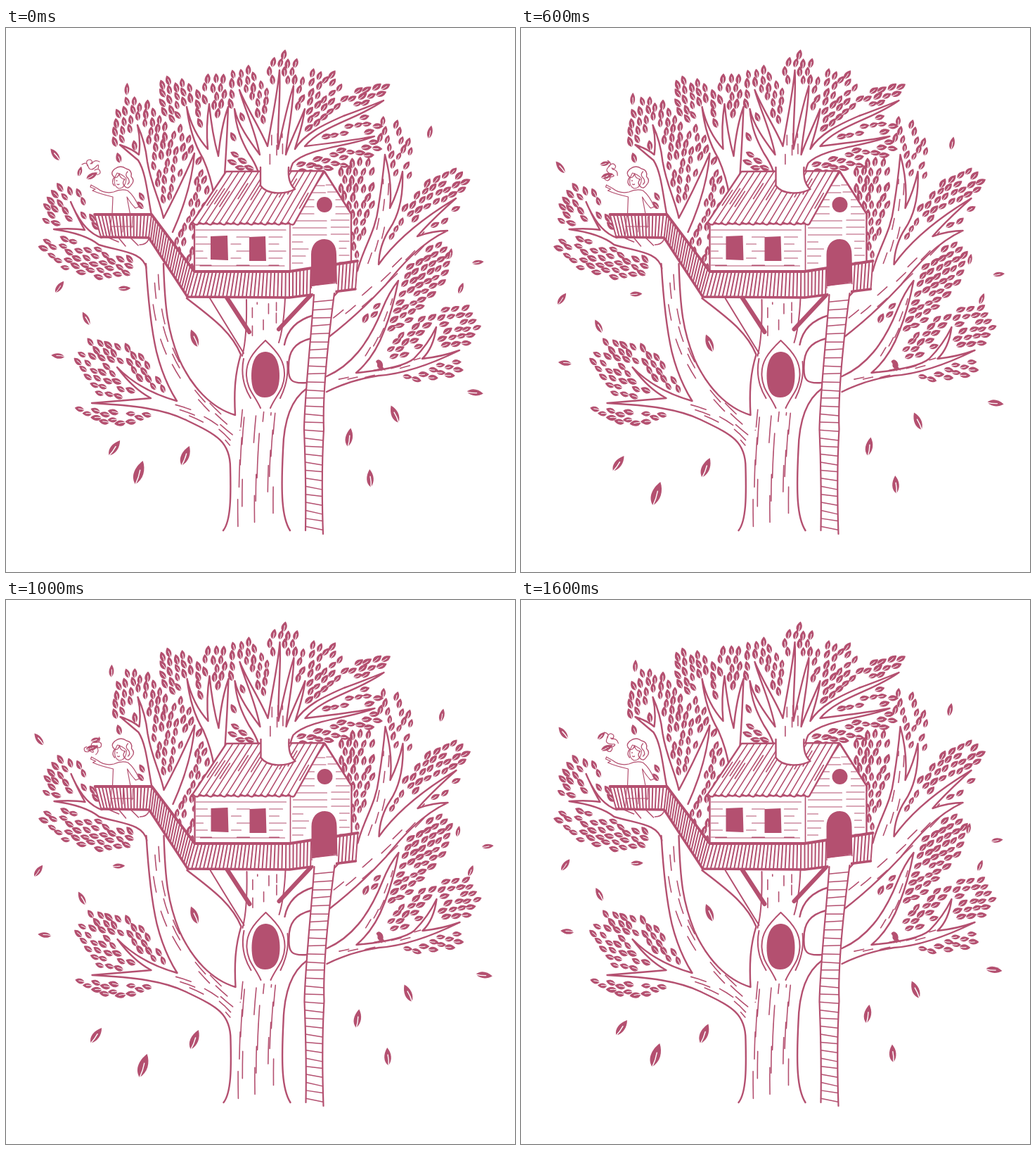
These frames come from a looping animation (724 by 773 pixels, 1.8 s). An HTML page:

```html
<!DOCTYPE html>
<html lang="en">
<head>
<meta charset="utf-8">
<title>Tree house</title>
<style>
html, body { margin: 0; width: 100%; height: 100%; overflow: hidden; background: #fff; }
svg { display: block; width: 724px; height: 773px; }
</style>
</head>
<body>
<svg id="stage" viewBox="0 0 724 773" stroke-linecap="round" stroke-linejoin="round"></svg>
<script>
const INK = '#b45070', PAPER = '#fff';
const stage = document.getElementById('stage');

function add(tag, attrs, parent = stage) {
  const el = document.createElementNS('http://www.w3.org/2000/svg', tag);
  for (const k in attrs) el.setAttribute(k, attrs[k]);
  parent.appendChild(el);
  return el;
}
const tree = add('g', {});
const line = (d, w = 1.6, p = tree) => add('path', { d, fill: 'none', stroke: INK, 'stroke-width': w }, p);
const shape = (d, w = 2.4) => add('path', { d, fill: PAPER, stroke: INK, 'stroke-width': w }, tree);
const solid = (d, p = tree) => add('path', { d, fill: INK }, p);
const blank = d => add('path', { d, fill: PAPER }, tree);
const mix = (a, b, t) => a + (b - a) * t;

let seed = 11;
const rnd = () => (seed = (seed * 16807) % 2147483647) / 2147483647;
const spread = r => (rnd() * 2 - 1) * r;

// Leaf body and rib; an angle of 0 points the tip up.
function leafPaths(x, y, angle, len, fat = 1) {
  const c = Math.cos(angle), s = Math.sin(angle);
  const p = (u, v) => {
    u *= len * fat; v *= len;
    return (x + u * c - v * s).toFixed(1) + ' ' + (y + u * s + v * c).toFixed(1) + ' ';
  };
  return [
    'M' + p(-.04, .52) + 'C' + p(-.42, .26) + p(-.34, -.18) + p(.06, -.54) +
      'C' + p(.36, -.2) + p(.36, .24) + p(-.04, .52) + 'Z',
    'M' + p(-.03, .52) + 'Q' + p(.06, .2) + p(.03, -.12)
  ];
}
function looseLeaf(parent, angle, len, fat) {
  const g = add('g', {}, parent), [body, rib] = leafPaths(0, 0, angle * Math.PI / 180, len, fat);
  solid(body, g);
  add('path', { d: rib, fill: 'none', stroke: PAPER, 'stroke-width': len > 19 ? 1.4 : 1 }, g);
  return g;
}

// Limbs
const bark = [
  // crown
  'M362 232C363 210 357 196 345 178C335 160 327 142 325 115C330 138 346 160 361 180C353 140 338 112 332 88C343 115 360 140 372 168C378 130 386 95 389 60C391 95 386 135 387 172C395 135 400 110 409 82C408 120 400 150 398 180C405 160 415 140 425 115C422 140 414 160 411 172C425 150 450 138 480 125C500 118 515 112 537 103C500 130 450 138 425 168C450 165 490 160 524 154C490 168 430 170 408 192C402 205 402 215 411 232',
  // upper left pair
  'M296 240Q292 212 280 185Q262 155 257 112Q265 148 287 172Q284 140 289 108Q293 150 302 182Q306 140 316 112Q314 165 311 208',
  'M207 266C201 235 199 205 188 188Q176 178 162 166Q180 172 189 180Q192 160 187 138Q198 162 201 190C207 225 219 245 224 270Q248 225 268 178Q264 230 237 290',
  // balcony branch
  'M136 298Q110 290 92 247Q103 272 112 287Q94 284 68 286Q112 292 132 308C165 318 195 318 200 342',
  // right limbs
  'M460 388L500 345C508 312 526 290 530 252Q536 215 539 180Q550 220 546 256Q558 232 564 204Q566 255 546 285Q531 308 530 336C552 305 585 275 640 242Q604 274 585 296Q608 288 628 288C590 305 560 340 540 365Q500 408 458 440',
  'M456 495C490 480 515 450 535 400Q545 375 558 359Q550 400 538 430Q524 468 498 490C530 487 565 482 580 470Q600 450 612 425Q608 455 592 470Q620 467 645 458C600 480 560 492 530 494Q490 500 456 517',
  // lower left branch and trunk side
  'M199 335C202 385 206 425 214 460Q224 500 243 530Q190 515 158 482Q180 512 206 526Q160 530 122 533C180 536 225 541 258 558C300 578 319 588 319 625C320 665 320 700 309 714'
].map(d => shape(d));
line('M224 335C226 400 230 430 246 470C264 510 292 540 326 550C324 515 326 490 334 464C320 430 290 410 257 384', 2.4);
line('M290 384Q318 430 338 462M342 386Q343 440 336 466M397 384Q395 425 388 447', 2);
line('M438 408Q402 418 396 450M434 441C410 447 402 460 402 480C401 500 405 506 428 504M428 512C405 528 395 560 394 600C391 660 392 695 404 714', 2.4);

// Short strokes scattered along a limb's spine.
function grain(d, half, n, len = 22) {
  const spine = line(d), total = spine.getTotalLength();
  let out = '';
  for (let i = 0; i < n; i++) {
    const off = half * (i % 3 - 1) + spread(half * .3), from = total * (i + rnd()) / n;
    for (let k = 0; k < 3; k++) {
      const s = Math.min(total, from + k * len / 2);
      const p = spine.getPointAtLength(s), a = spine.getPointAtLength(s - 1), b = spine.getPointAtLength(s + 1);
      const m = Math.hypot(b.x - a.x, b.y - a.y) || 1;
      out += `${k ? 'L' : 'M'}${p.x - (b.y - a.y) / m * off} ${p.y + (b.x - a.x) / m * off}`;
    }
  }
  spine.setAttribute('d', out);
}
grain('M356 712Q354 620 362 545', 20, 18, 38);
grain('M212 345C215 430 235 500 330 575', 6, 16);
grain('M225 537Q290 550 322 590', 5, 6);
grain('M369 440V390', 15, 7, 14);
grain('M465 420Q530 370 600 295', 6, 10, 18);
grain('M516 340Q540 280 541 215', 4, 7, 16);
grain('M465 503Q530 490 590 472', 3, 7, 14);
grain('M506 478Q536 435 550 385', 2, 5, 14);
grain('M385 195V150', 9, 6, 14);

// Foliage
const barkDots = [], placed = [], probe = stage.createSVGPoint();
for (const b of bark) {
  const n = b.getTotalLength();
  for (let s = 0; s < n; s += 5) barkDots.push(b.getPointAtLength(s));
}
const near = (list, x, y, r) => list.some(p => Math.hypot(p.x - x, p.y - y) < r);
function isFree(x, y) {
  const byGirl = x > 112 && x < 188 && y > 192 && y < 262;
  if (byGirl || near(barkDots, x, y, 6.8) || near(placed, x, y, 9.6)) return false;
  probe.x = x; probe.y = y;
  return !bark.some(b => b.isPointInFill(probe));
}

let bodies = '', ribs = '';
// Staggered rows in a rounded patch from base to tip, fanning out towards the tip.
function foliage(x1, y1, x2, y2, half, len = 13.5) {
  const cx = (x1 + x2) / 2, cy = (y1 + y2) / 2, long = Math.hypot(x2 - x1, y2 - y1) / 2;
  const a = Math.atan2(x2 - x1, y1 - y2), c = Math.cos(a), s = Math.sin(a);
  const du = len * .8, dv = len * .9, rows = Math.ceil(long / dv), cols = Math.ceil(half / du);
  for (let r = -rows; r <= rows; r++) for (let k = -cols; k <= cols; k++) {
    const u = (k + (r & 1) / 2) * du + spread(1), v = r * dv + spread(1.5);
    if (Math.abs(u / half) ** 2.5 + Math.abs(v / long) ** 2.5 > 1) continue;
    const x = cx + u * c - v * s, y = cy + u * s + v * c;
    if (!isFree(x, y)) continue;
    placed.push({ x, y });
    const fan = Math.atan2(u, long * 1.6 - v) + spread(.2);
    const [b, q] = leafPaths(x, y, a + fan, len * (.92 + rnd() * .2));
    bodies += b; ribs += q;
  }
}
// left
foliage(128, 288, 64, 238, 37);
foliage(182, 346, 46, 306, 25);
foliage(225, 270, 176, 102, 43);
foliage(230, 255, 262, 130, 27);
foliage(258, 342, 275, 180, 25, 12.5);
foliage(218, 528, 108, 458, 40);
foliage(208, 551, 98, 540, 17);
// top
foliage(302, 205, 230, 74, 34);
foliage(302, 202, 292, 64, 27);
foliage(368, 192, 326, 54, 33);
foliage(392, 185, 396, 36, 30);
foliage(405, 170, 460, 64, 33);
foliage(430, 156, 552, 82, 22);
foliage(430, 166, 532, 138, 18);
foliage(405, 196, 528, 166, 18);
foliage(362, 198, 310, 180, 16);
// right
foliage(498, 285, 498, 170, 26);
foliage(515, 345, 552, 126, 38, 12.5);
foliage(540, 325, 650, 205, 30);
foliage(513, 428, 622, 300, 42);
foliage(548, 475, 668, 408, 33);
foliage(568, 490, 645, 480, 17);
solid(bodies);
add('path', { d: ribs, fill: 'none', stroke: PAPER, 'stroke-width': 1 }, tree);

// Hollow
line('M369 444C350 462 341 475 342 494C343 514 354 522 362 540M369 444C388 462 397 475 396 494C395 514 384 522 376 540M338 470Q332 500 348 526M400 474Q403 500 390 526', 2);
solid('M369 460C382 460 389 474 389 494C389 514 382 525 368 525C355 525 349 514 349 494C349 474 356 460 369 460Z');

// House walls
shape('M268 278V347H404L491 336V264L453 204L404 278Z');
line('M404 278V347');
let planks = 'M276 338H396M280 287H390';
for (let i = 0; i < 6; i++) {
  const y = 287 + i * 10;
  planks += `M270 ${y}h${10 + i % 3 * 6}M${320 + i % 2 * 8} ${y}h${14 + i % 2 * 4}M374 ${y}H${398 - i % 3 * 5}`;
}
for (let i = 0; i < 12; i++) {
  const y = 224 + i * 10, edge = Math.min(488, 461 + (y - 220) * .63), left = Math.max(408, 440 - (y - 220) * .62);
  planks += y > 295 ? `M407 ${y}H${430 - i % 3 * 4}M474 ${y - 1}H${488 - i % 2 * 4}`
    : y > 238 && y < 266 ? `M${left} ${y}H438M469 ${y}H${edge}`
    : `M${left} ${y}H${mix(left, edge, .6)}M${mix(left, edge, .68)} ${y - 1}H${edge}`;
}
line(planks, 1.2);
solid('M291 296L315 295L316 330L291 329ZM346 297L369 296L370 331L346 331Z');
add('circle', { cx: 453, cy: 251, r: 11, fill: INK }, tree);

// Roof
const waves = 15;
let eave = 'M452 203L411 276', seams = '';
for (let i = waves - 1; i >= 0; i--) {
  const x = mix(265, 411, i / waves);
  eave += `Q${x + 7} ${283 - i % 2 * 2} ${x} 276`;
}
shape(eave + 'L313 204Z');
for (let i = 1; i < 2 * waves; i++) {
  const t = i / 2 / waves, from = i % 2 ? .08 + rnd() * .4 : 0, to = i % 2 ? from + .3 : .98;
  const at = k => `${mix(mix(313, 452, t), mix(265, 411, t), k)} ${mix(204, 276, k)}`;
  if (i % 2 === 0 || rnd() > .45) seams += `M${at(from)}L${at(to)}`;
}
line(seams);
const opening = 'M362 198V224C372 238 398 236 411 229C403 222 401 210 402 198';
blank(opening + 'Z');
line(opening, 2.4);
line('M453 204L491 264', 2.4);

// Girl
shape('M153 233Q140 236 130 228L121 223L120 226L127 229L123 231Q134 236 152 240L150 288H181L172 240Q178 250 184 256L189 254Q182 238 173 231Q164 228 153 233Z', 1.2);
shape('M155 212Q152 224 160 228Q170 228 171 214Q166 208 158 206Z', 1.1);
line('M154 212Q147 206 155 200Q163 194 171 200Q180 202 178 211Q184 217 178 223Q174 230 169 225Q164 220 169 215Q162 214 161 207Q159 214 154 212Q149 219 154 224M173 204Q168 209 174 214Q177 219 173 222M157 217h1M158 222q2 1 3 0', 1.3);

// Braces and deck
line('M314 383L346 432M433 380L388 428', 6);
line('M160 298L170 310M178 299L188 309M146 298L160 304M190 308Q200 308 203 300');
const rail = [[126, 265], [207, 265], [268, 346], [403, 346], [500, 331]];
const sill = [[135, 297], [203, 298], [258, 382], [403, 383], [497, 371]];
const run = a => a.map(p => p.join(' ')).join('L');
blank('M' + run(rail) + 'L' + run([...sill].reverse()) + 'Z');
line('M150 267L148 294M166 268V290M180 268L179 284M148 282H181', 1);
let posts = '';
for (let i = 0; i < 4; i++) {
  const n = Math.round(Math.hypot(rail[i + 1][0] - rail[i][0], rail[i + 1][1] - rail[i][1]) / 5.2);
  for (let k = 0; k <= n; k++) {
    const at = a => `${mix(a[i][0], a[i + 1][0], k / n)} ${mix(a[i][1], a[i + 1][1], k / n)}`;
    posts += `M${at(rail)}L${at(sill)}`;
  }
}
line(posts, 2);
line('M' + run(rail), 3.8);
line('M' + run(sill), 3.4);

// Door and ladder
solid('M434 370V322C434 308 442 300 453 300C464 300 470 309 470 322L471 364Z');
blank('M435 367L470 361L468 378L437 380Z');
line('M435 366L470 362');
const leftRail = 'M438 379C434 440 425 520 424 570C426 620 427 660 426 714';
const rightRail = 'M467 377C460 430 450 520 452 570C449 620 449 660 451 719';
blank(leftRail + 'L451 719C449 660 449 620 452 570C450 520 460 430 467 377Z');
const sides = [leftRail, rightRail].map(d => line(d, 2.2));
let rungs = '';
for (let i = 0; i < 29; i++) {
  const [a, b] = sides.map(p => p.getPointAtLength(p.getTotalLength() * (i + .9) / 29.4));
  rungs += `M${a.x} ${a.y}L${b.x} ${b.y - 1 + i % 3}`;
}
line(rungs, 1.5);

// Bird
solid('M526 474Q528 470 532 472Q537 475 536 482L540 487L533 484Q527 484 528 477Z');
line('M531 483L530 487M534 483L534 487', 1);

// Drifting leaves: resting place, angle, length and farthest shift.
const drift = [];
function drifter(x, y, angle, len, dx, dy) {
  drift.push({ g: looseLeaf(stage, angle, len, .73), x, y, dx, dy });
}
drifter(172, 87, -2, 17, -22, 14);
drifter(70, 180, -42, 20, -23, 18);
drifter(76, 368, 32, 19, -30, 17);
drifter(168, 370, 84, 17, -8, 8);
drifter(114, 413, -33, 20, -6, 11);
drifter(74, 466, -88, 18, -19, 10);
drifter(268, 441, -26, 25, 0, 7);
drifter(154, 597, 32, 25, -26, 22);
drifter(189, 632, 14, 33, 6, 30);
drifter(255, 608, 18, 28, 13, 17);
drifter(603, 148, 8, 18, 17, 16);
drifter(632, 321, 8, 15, 11, 8);
drifter(671, 333, 78, 16, 14, 17);
drifter(647, 370, 18, 16, 14, 15);
drifter(667, 518, 92, 22, 13, 15);
drifter(553, 549, -28, 25, 19, 10);
drifter(488, 582, 5, 25, 12, 13);
drifter(518, 640, -8, 24, 25, 9);

// Swirl above the hand
const flyer = looseLeaf(stage, 10, 14, .8), hover = looseLeaf(stage, 55, 17, .8), curls = add('g', {});
line('M-12 -9q7-5 9 3q3 8 11 0q5-6 3 3M-4 -7q-4-9 4-9q5 3 0 6M2 -10q4-7 11-3M6 -1q8-4 8 4q-4 5-7 0', 1.2, curls);
const place = (g, x, y, turn = 0) => g.setAttribute('transform', `translate(${x} ${y}) rotate(${turn})`);

function show(ms) {
  const step = Math.floor(ms % 1800 / 200);
  const sway = Math.min(1, step / 5, (9.5 - step) / 3.5);
  const drop = Math.min(1, step / 3, (9.5 - step) / 3);
  for (const d of drift) place(d.g, d.x + d.dx * sway, d.y + d.dy * drop);
  const a = Math.PI * (1 + .8 * sway), r = 15 - 6 * sway;
  place(flyer, 120 + r * Math.cos(a), 204 + r * Math.sin(a), 60 * drop);
  place(hover, 122, 210, 15 * sway);
  place(curls, 120, 203, 110 * sway);
  place(tree, step ? .5 : 0, 0);
}
const start = performance.now();
function tick() {
  show(performance.now() - start);
  requestAnimationFrame(tick);
}
tick();
</script>
</body>
</html>
```
